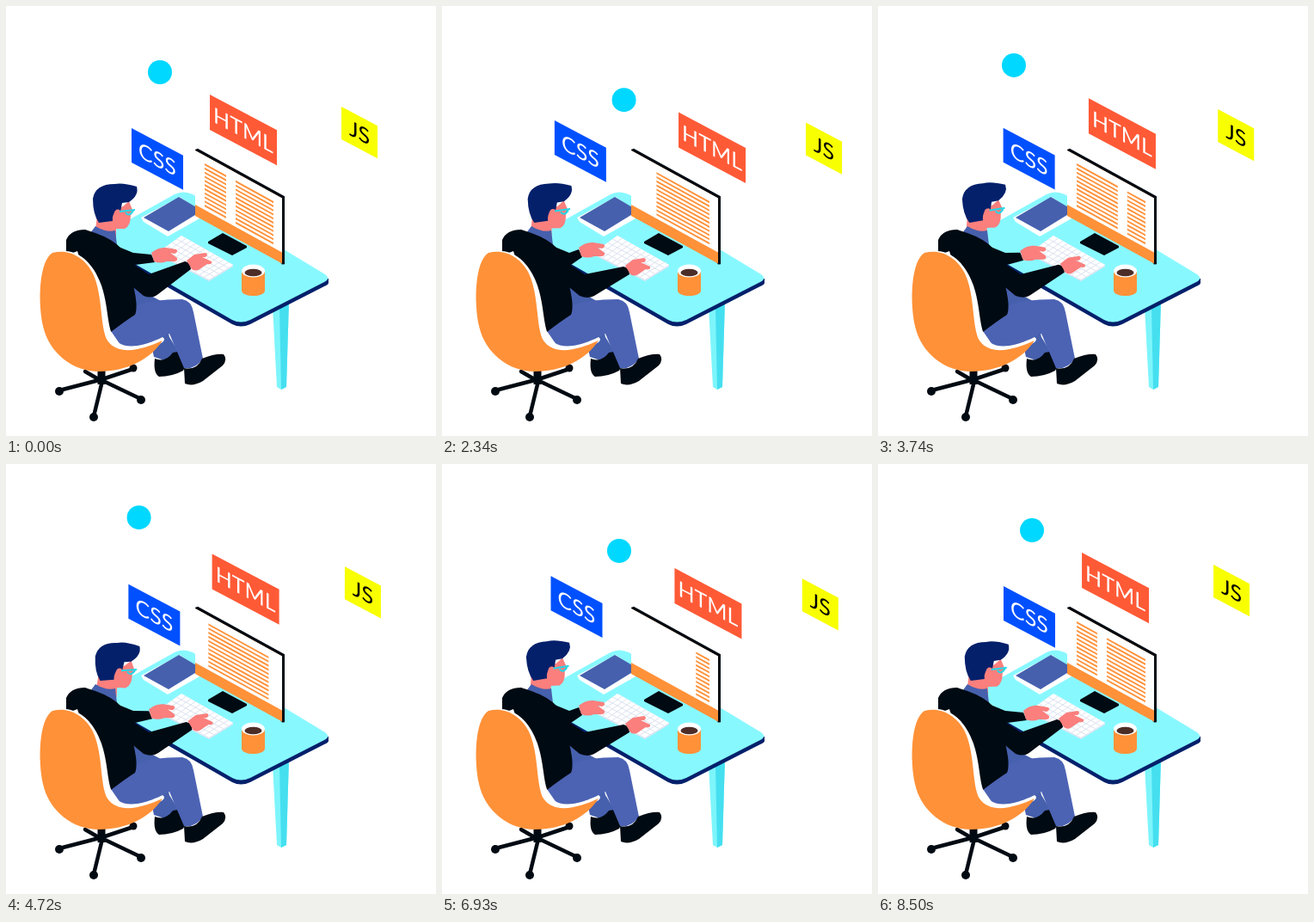
Animation, 500 px wide and 500 px high, one loop 8.54 s. Source, as an HTML page:

```html
<!DOCTYPE html>
<html lang="en">
<head>
<meta charset="utf-8">
<title>Developer at a desk</title>
<style>
  html, body { margin: 0; width: 100%; height: 100%; overflow: hidden; background: #fff; }
  svg { display: block; width: 100%; height: 100%; }
  text { font: 25px Lato, "Open Sans", sans-serif; text-anchor: middle; }
</style>
</head>
<body>
<svg viewBox="0 0 500 500">
  <defs>
    <clipPath id="page"><rect x="11" y="0" width="80" height="90"/></clipPath>
  </defs>

  <!-- desk -->
  <path fill="#7df5fb" d="M310 350L329 343L326 443L320 446L315 443Z"/>
  <path fill="#45dff0" d="M318 350L329 343L326 443L320 446Z"/>
  <path fill="#04206b" d="M375 317V322Q375 324 370 326L284 370Q273 375 263 370L120 288V278Z"/>
  <path fill="#88f8ff" d="M196 219Q206 214 217 219L371 312Q378 317 370 321L284 365Q273 370 263 365L110 277V267Z"/>

  <!-- folder, stand, keyboard -->
  <path fill="#fff" d="M157 246L160 251L188 268L227 246V239L202 222Z"/>
  <path fill="#4660ad" d="M160 246L201 222L228 238L189 262Z"/>
  <path fill="#000a12" d="M235 274L252 264L280 279V281L263 290L235 276Z"/>
  <path fill="#dfe6f2" d="M176 287L204 267L264 301V303L236 320L176 289Z"/>
  <path fill="#fff" d="M176 287L204 267L264 301L236 318Z"/>
  <g id="keys" stroke="#dce3ef" stroke-width="1"></g>

  <!-- monitor -->
  <g transform="matrix(1 .55 0 1 220 165)">
    <path fill="#000a12" d="M0 2L3 -1H104V78L101 80L0 6Z"/>
    <rect y="3" width="101" height="76" fill="#ff9138"/>
    <rect y="3" width="101" height="63" fill="#fff"/>
    <g clip-path="url(#page)"><g id="code" fill="#ff9138"></g></g>
  </g>

  <!-- mug -->
  <path fill="#ff9138" d="M274 308V331C275 339 300 339 301 331V308Z"/>
  <ellipse cx="287.5" cy="308" rx="13.5" ry="7.5" fill="#fff"/>
  <ellipse cx="287.5" cy="310" rx="10" ry="4.3" fill="#4d2d28"/>

  <!-- floating cards -->
  <g id="cards"></g>
  <circle id="disc" r="14" fill="#00d8ff"/>

  <!-- legs and shoes -->
  <path fill="#4660ad" d="M148 326L180 343L190 385L202 404L190 414L172 408L165 375L140 350Z"/>
  <path fill="#000a12" d="M173 410Q185 415 194 403L200 402L209 418L206 424Q193 431 178 431Q171 427 173 410Z"/>
  <path fill="#4c63b4" d="M122 378L150 349Q168 341 205 341Q216 343 218 356L229 410Q220 423 207 421L190 381L140 404Z"/>
  <path fill="#000a12" d="M207 421Q222 424 228 410Q243 404 253 405Q258 411 252 418L229 436Q217 443 208 439Z"/>

  <!-- chair base -->
  <g stroke="#000a12" stroke-width="4.5" stroke-linecap="round" fill="none">
    <path d="M111 422V440" stroke-width="9" stroke-linecap="butt"/>
    <path d="M62 447L112 434L148 422M111 435L157 457M112 436L102 477M92 425L111 436"/>
  </g>
  <g fill="#000a12">
    <circle cx="62" cy="448" r="5"/><circle cx="148" cy="421" r="4.5"/>
    <circle cx="157" cy="458" r="5"/><circle cx="102" cy="478" r="5"/>
  </g>

  <!-- far arm -->
  <path id="farSleeve" fill="#000a12"/>
  <path id="farHand" fill="#fa7f7d" d="M159 281Q167 274 176 275L188 277Q191 280 186 282L181 281L189 287Q190 291 185 291L177 291Q169 294 162 291Z"/>

  <!-- head -->
  <g id="head">
    <path fill="#fa7f7d" d="M106 244L136 233L143 227L147 237L145 243Q145 256 138 259L128 259V270L104 260Z"/>
    <path fill="#04206b" d="M101 224Q104 207 126 207Q136 205 152 210Q155 220 143 228L135 229L133 239L127 238Q123 245 124 250L108 252Q101 242 101 224Z"/>
    <ellipse cx="130" cy="241" rx="3.6" ry="4.5" fill="#fa7f7d"/>
    <path d="M132 239L150 237M139 240Q143 246 148 238" fill="none" stroke="#25d6e6" stroke-width="2"/>
  </g>

  <!-- body -->
  <path fill="#4660ad" d="M104 256Q117 264 127 261L129 278L98 264Z"/>
  <path fill="#000a12" d="M70 272Q75 260 92 260L104 264Q124 271 134 282Q146 297 148 325Q154 350 150 359Q139 366 122 379L110 372L83 285L70 290Z"/>
  <path id="nearSleeve" fill="#000a12"/>
  <path id="nearHand" fill="#fa7f7d" d="M213 302L222 295L235 293Q239 295 235 298L231 298L242 303Q243 307 237 306L231 310Q224 316 219 312Z"/>

  <!-- chair shell -->
  <path fill="#fff" d="M56 286C78 281 99 292 111 325C121 355 116 379 130 391C142 400 164 394 182 385Q186 387 182 391C163 403 126 412 114 387Z"/>
  <path fill="#ff9138" d="M54 287C38 297 37 345 43 372C50 404 78 425 108 425C140 425 168 411 182 389C160 399 131 408 118 389C109 374 113 336 101 311C92 293 74 282 54 287Z"/>
</svg>

<script>
const LOOP = 8540;
const NS = "http://www.w3.org/2000/svg";
const $ = id => document.getElementById(id);

function add(parent, name, attrs) {
  const el = document.createElementNS(NS, name);
  for (const key in attrs) el.setAttribute(key, attrs[key]);
  return parent.appendChild(el);
}

// Smooth curve through [time, value] points that rests at each turning point.
function track(points, t) {
  let i = 0;
  while (i < points.length - 2 && t >= points[i + 1][0]) i++;
  const slope = k => k < 0 || k > points.length - 2 ? 0
    : (points[k + 1][1] - points[k][1]) / (points[k + 1][0] - points[k][0]);
  const tangent = k => {
    const a = slope(k - 1), b = slope(k);
    return a * b > 0 ? 2 * a * b / (a + b) : 0;
  };
  const [t0, a] = points[i], [t1, b] = points[i + 1];
  const d = t1 - t0, u = (t - t0) / d;
  const ease = u * u * (3 - 2 * u);
  return a + (b - a) * ease
    + d * u * (1 - u) * ((1 - u) * tangent(i) - u * tangent(i + 1));
}

// Swing between 0 and alternating far ends.
const swing = (times, ends) =>
  times.map((time, i) => [time, ends[i]]);

const cards = [
  { label: "CSS", x: 146, y: 142, w: 60, h: 40, fill: "#0050ff", ink: "#fff", slope: .6,
    move: swing([0, 1550, 4050, 6500, LOOP], [0, -20, .5, -22, 0]) },
  { label: "HTML", x: 237, y: 103, w: 78, h: 41, fill: "#ff5a36", ink: "#fff", slope: .54,
    move: swing([0, 2130, 4400, 6430, LOOP], [0, 39, 0, 39, 0]) },
  { label: "JS", x: 390, y: 117, w: 42, h: 38, fill: "#f8ff00", ink: "#000", slope: .56,
    move: swing([0, 2135, 4270, 6405, LOOP], [0, 34, 0, 34, 0]) }
];

for (const card of cards) {
  card.el = add($("cards"), "g", {});
  add(card.el, "rect", { width: card.w, height: card.h, fill: card.fill });
  add(card.el, "text", { x: card.w / 2, y: card.h / 2 + 9, fill: card.ink })
    .textContent = card.label;
}

const discX = [[0, 179], [1260, 202], [2250, 212], [3740, 158], [4200, 145],
  [5610, 186], [6550, 207], [6930, 206], [LOOP, 179]];
const discY = [[0, 77], [1260, 98.5], [2250, 109.5], [3740, 69], [4200, 54],
  [5610, 88], [6500, 102], [6930, 101], [LOOP, 77]];

// Two columns of code lines, in the skewed plane of the screen.
for (const [x, width] of [[-34, 70], [47, 90]]) {
  for (let row = 0; row < 11; row++) {
    add($("code"), "rect", { x, y: 12 + row * 4.8, width, height: 2.1 });
  }
}

// Keyboard grid between its left, top and bottom corners.
for (let i = 1; i < 11; i++) {
  const u = i / 11;
  add($("keys"), "path", { d: `M${176 + 60 * u} ${287 + 31 * u}L${204 + 60 * u} ${267 + 34 * u}` });
}
for (let i = 1; i < 5; i++) {
  const u = i / 5;
  add($("keys"), "path", { d: `M${176 + 28 * u} ${287 - 20 * u}L${236 + 28 * u} ${318 - 17 * u}` });
}

function codeShift(t) {
  const elapsed = t < 2700 ? t : t < 7600 ? t - 2900 : t - LOOP;
  return elapsed * .0271;
}

function drawArms(t) {
  const wave = (1 + Math.cos(4 * Math.PI * t / LOOP)) / 2;
  const far = wave ** 3, near = wave ** 6;
  const fx = 10 * far, fy = 6 * far, ny = -6 * near, nx = -3 * near;
  $("farHand").setAttribute("transform", `translate(${fx} ${fy})`);
  $("farSleeve").setAttribute("d",
    `M126 278L148 287L${159 + fx} ${283 + fy}L${163 + fx} ${292 + fy}L150 301L130 306Z`);
  $("nearHand").setAttribute("transform", `translate(${nx} ${ny})`);
  $("nearSleeve").setAttribute("d",
    `M124 285L146 299L166 312L${211 + nx} ${303 + ny}Q${218 + nx} ${304 + ny} ${218 + nx} ${312 + ny}` +
    `L177 ${337 + ny / 3}Q170 341 160 337L143 323Z`);
}

function draw(t) {
  for (const card of cards) {
    const shift = track(card.move, t);
    card.el.setAttribute("transform",
      `matrix(1 .53 0 1 ${card.x + shift} ${card.y + shift * card.slope})`);
  }
  $("disc").setAttribute("cx", track(discX, t));
  $("disc").setAttribute("cy", track(discY, t));
  $("code").setAttribute("transform", `translate(${codeShift(t)} 0)`);
  $("head").setAttribute("transform",
    `rotate(${4.2 * Math.sin(4 * Math.PI * t / LOOP)} 107 285)`);
  drawArms(t);
}

const start = performance.now();
function tick() {
  draw((performance.now() - start) % LOOP);
  requestAnimationFrame(tick);
}
tick();
</script>
</body>
</html>
```
